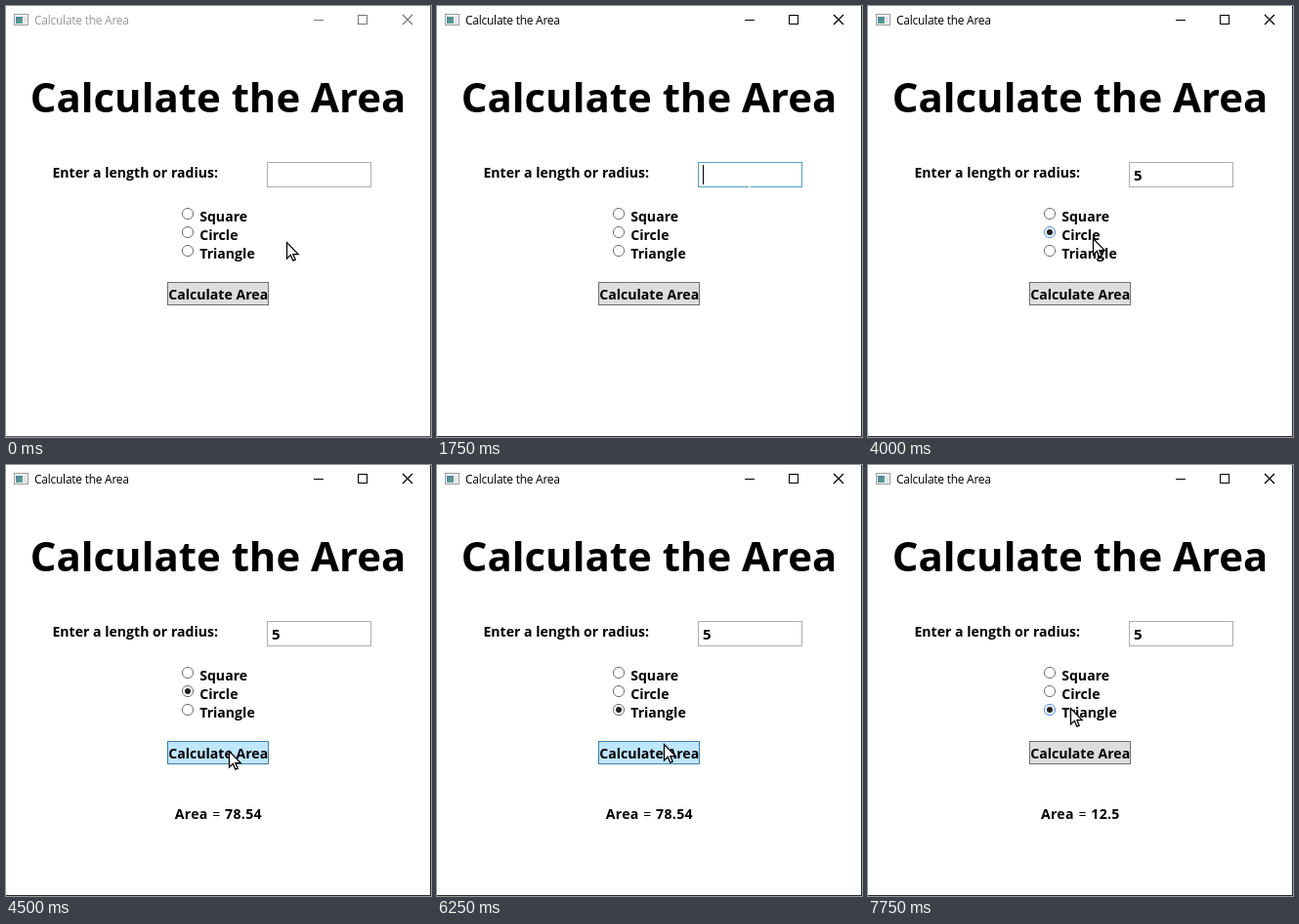
Recreate the animation shown at these times as an HTML page. Size 435 px wide and 442 px high, loop 8000 ms.

```html
<!DOCTYPE html>
<html lang="en">
<head>
<meta charset="utf-8">
<title>Calculate the Area</title>
<style>
html, body { margin: 0; width: 100%; height: 100%; overflow: hidden; background: #fff; }
svg { display: block; width: 435px; height: 442px; }
text { font: 700 14.1px "Open Sans", "Noto Sans", sans-serif; fill: #000; }
.mid { text-anchor: middle; }
.title { font-size: 12px; font-weight: 400; letter-spacing: -.25px; }
.head { font-size: 41.95px; }
.value { font-size: 15px; }
.area { letter-spacing: .3px; word-spacing: .6px; }
.area tspan { font-weight: 400; }

/* One 8 s loop; every change is a hard step. */
.anim, .anim * { animation: 8s step-end infinite; }

.anim .title { animation-name: titleOn; }
@keyframes titleOn { 0% { fill: #999; } 9.375%, 100% { fill: #000; } }

.anim .chrome { fill: none; shape-rendering: crispEdges; animation-name: chromeOn; }
.anim .close { shape-rendering: auto; stroke-width: 1.25; }
@keyframes chromeOn { 0% { stroke: #777; } 9.375%, 100% { stroke: #000; } }

.anim .frame { fill: none; shape-rendering: crispEdges; animation-name: frameOn; }
@keyframes frameOn { 0% { stroke: #555; } 9.375%, 100% { stroke: #2a2a2a; } }

.anim .box { fill: #fff; animation-name: boxFocus; }
@keyframes boxFocus {
  0% { stroke: #abadb3; }
  6.25% { stroke: #7eb4ea; }
  9.375% { stroke: #569dc5; }
  50%, 100% { stroke: #abadb3; }
}

.anim .value { animation-name: typed; }
@keyframes typed { 0% { visibility: hidden; } 28.125%, 100% { visibility: visible; } }

.anim .caret { animation-name: blink; }
@keyframes blink {
  0%, 15.625%, 34.375%, 46.875%, 100% { visibility: hidden; }
  9.375%, 21.875% { visibility: visible; transform: none; }
  28.125%, 40.625% { visibility: visible; transform: translate(8px, 0); }
}

.anim .ibeam { animation-name: ibeam; }
@keyframes ibeam { 0%, 28.125%, 100% { visibility: hidden; } 6.25% { visibility: visible; } }

.ring { fill: #fff; stroke: #707070; }
.dot { fill: #212121; }
.anim .circle .ring { animation-name: circleHover; }
@keyframes circleHover {
  0%, 53.125%, 100% { fill: #fff; stroke: #707070; }
  40.625% { fill: #f3f9ff; stroke: #5593e8; }
}
.anim .circle .dot { animation-name: circleOn; }
@keyframes circleOn { 0%, 75%, 100% { visibility: hidden; } 50% { visibility: visible; } }

.anim .triangle .ring { animation-name: triangleHover; }
@keyframes triangleHover {
  0%, 78.125% { fill: #fff; stroke: #707070; }
  65.625%, 96.875%, 100% { fill: #f3f9ff; stroke: #5593e8; }
}
.anim .triangle .dot { animation-name: triangleOn; }
@keyframes triangleOn { 0% { visibility: hidden; } 75%, 100% { visibility: visible; } }

.anim .button { animation-name: buttonHover; }
@keyframes buttonHover {
  0%, 65.625%, 96.875%, 100% { fill: #ddd; stroke: #707070; }
  53.125%, 78.125% { fill: #bee6fd; stroke: #457fa5; }
}

.anim .first { animation-name: firstArea; }
@keyframes firstArea { 0%, 90.625%, 100% { visibility: hidden; } 56.25% { visibility: visible; } }
.anim .second { animation-name: secondArea; }
@keyframes secondArea { 0% { visibility: hidden; } 90.625%, 100% { visibility: visible; } }

.anim .pointer { animation-name: move, pointerShown; }
@keyframes pointerShown { 0%, 40.625%, 100% { visibility: visible; } 6.25% { visibility: hidden; } }
@keyframes move {
  0% { transform: translate(287px, 242px); }
  3.125% { transform: translate(291px, 199px); }
  40.625% { transform: translate(247px, 233px); }
  43.75% { transform: translate(232px, 240px); }
  46.875% { transform: translate(231px, 239px); }
  50% { transform: translate(230px, 238px); }
  53.125% { transform: translate(229px, 291px); }
  56.25% { transform: translate(228px, 293px); }
  65.625% { transform: translate(247px, 262px); }
  68.75% { transform: translate(248px, 260px); }
  71.875% { transform: translate(248px, 247px); }
  78.125% { transform: translate(232px, 286px); }
  81.25% { transform: translate(234px, 292px); }
  84.375% { transform: translate(235px, 294px); }
  96.875%, 100% { transform: translate(207px, 249px); }
}
</style>
</head>
<body>
<svg class="anim" viewBox="0 0 435 442">
  <defs>
    <linearGradient id="pane" x2="1" y2="1">
      <stop stop-color="#4d7f9c"/>
      <stop offset="1" stop-color="#5fa58c"/>
    </linearGradient>
  </defs>

  <!-- Window -->
  <rect width="435" height="442" fill="#fff"/>
  <path class="frame" d="M434.5 0V441.5H0"/>
  <g shape-rendering="crispEdges">
    <rect x="8.5" y="8.5" width="14" height="11" fill="#f4f4f4" stroke="#979ca0"/>
    <rect x="10" y="11" width="7" height="7" fill="url(#pane)"/>
    <rect x="18" y="11" width="3" height="7" fill="#e2e6e8"/>
  </g>
  <text class="title" x="29" y="19">Calculate the Area</text>
  <path class="chrome" d="M315 14.5H325M360.5 9.5H369.5V18.5H360.5Z"/>
  <path class="chrome close" d="M406 9L416 19M416 9L406 19"/>

  <!-- Form -->
  <text class="head mid" x="217" y="109">Calculate the Area</text>
  <text x="47.4" y="176">Enter a length or radius:</text>
  <rect class="box" x="267.5" y="160.5" width="106" height="25"/>
  <text class="value" x="272" y="179">5</text>
  <rect class="caret" x="272" y="163" width="1" height="20"/>
  <path class="ibeam" d="M320 180V194" stroke="#fff" stroke-width="2"/>

  <g>
    <circle class="ring" cx="186" cy="213" r="5.6"/>
    <text x="198.2" y="221">Square</text>
  </g>
  <g class="circle">
    <circle class="ring" cx="186" cy="232" r="5.6"/>
    <circle class="dot" cx="186" cy="232" r="3"/>
    <text x="198.2" y="240">Circle</text>
  </g>
  <g class="triangle">
    <circle class="ring" cx="186" cy="251" r="5.6"/>
    <circle class="dot" cx="186" cy="251" r="3"/>
    <text x="198.2" y="259">Triangle</text>
  </g>

  <rect class="button" x="165.5" y="283.5" width="103" height="23"/>
  <text class="mid" x="217.2" y="301">Calculate Area</text>
  <text class="area mid first" x="217.3" y="363">Area <tspan>=</tspan> 78.54</text>
  <text class="area mid second" x="217.3" y="363">Area <tspan>=</tspan> 12.5</text>

  <path class="pointer" fill="#fff" stroke="#000" stroke-width="1.25" d="M.5 .5V17L4.3 13.4L6.8 19.2L9.2 18.2L6.8 12.5H12.2Z"/>
</svg>
</body>
</html>
```
